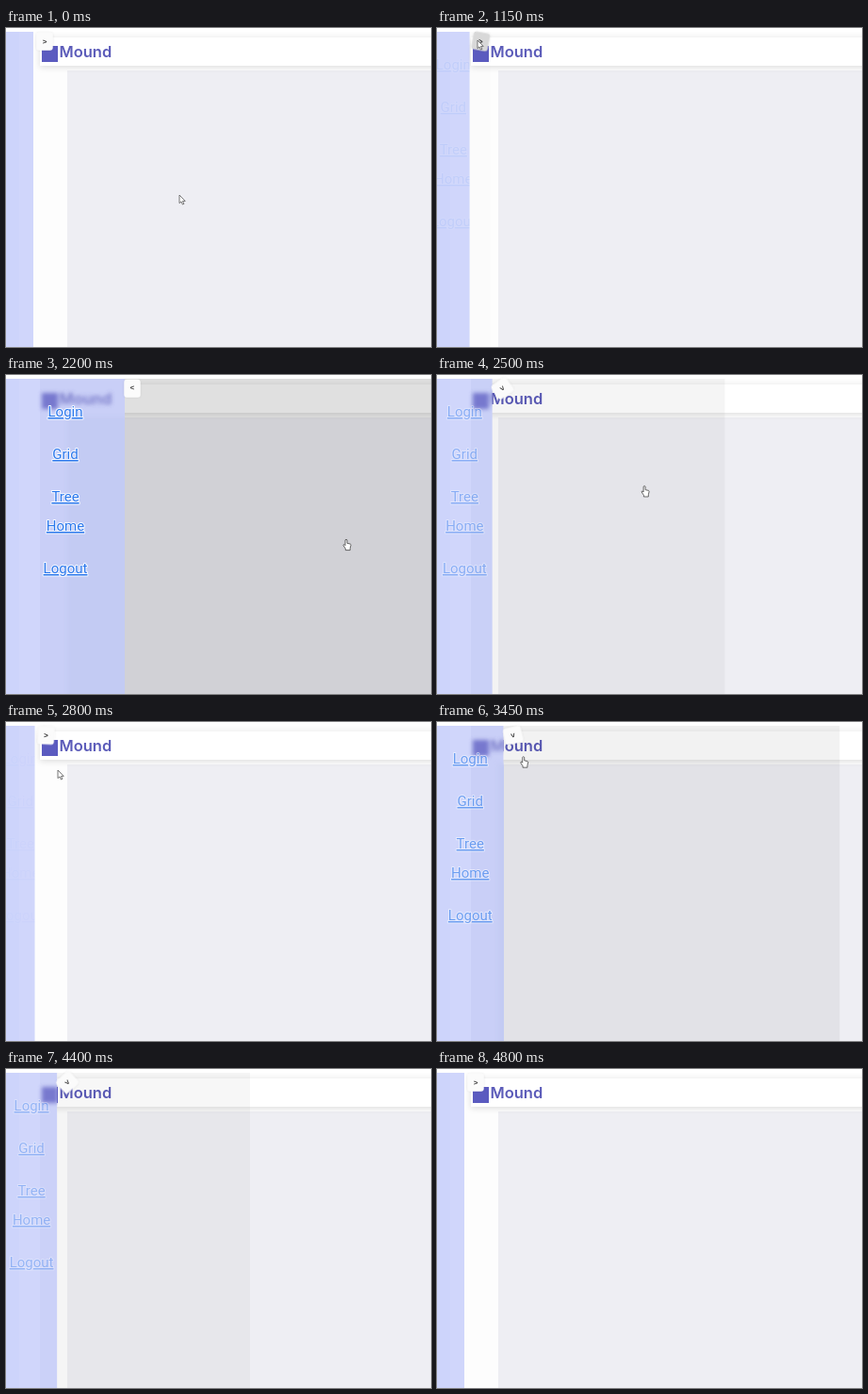
Write an HTML page that moves like this. It is 451 px wide and 338 px high and loops after 4850 ms.

```html
<!DOCTYPE html>
<html lang="en">
<head>
<meta charset="utf-8">
<title>Sliding side menu</title>
<style>
  html, body { margin: 0; width: 100%; height: 100%; overflow: hidden; background: #fff; }
  svg { display: block; width: 100vw; height: 100vh; }
  .brand { font: 600 16.5px Inter, sans-serif; fill: #5b5bb9; }
  .links text {
    font: 15px Roboto, sans-serif; text-anchor: middle; text-decoration: underline;
    fill: #2b78ec; stroke: #f4f7ff; stroke-width: 2px; stroke-linejoin: round; paint-order: stroke;
  }
  .glyph { font: bold 8px "Liberation Sans", Arial, sans-serif; text-anchor: middle; fill: #333; }
</style>
</head>
<body>
<svg viewBox="0 0 451 338" xmlns="http://www.w3.org/2000/svg">
  <defs>
    <filter id="soft" x="-20%" y="-20%" width="140%" height="140%">
      <feGaussianBlur stdDeviation="1.9"/>
    </filter>
    <filter id="drop" x="-5%" y="-50%" width="110%" height="200%">
      <feDropShadow dx="0" dy="1.5" stdDeviation="3" flood-color="#000" flood-opacity=".13"/>
    </filter>
    <filter id="lift" x="-30%" y="-30%" width="160%" height="160%">
      <feDropShadow dx="0" dy="0" stdDeviation="1" flood-color="#000" flood-opacity=".1"/>
    </filter>
    <clipPath id="pane"><rect id="paneBox" y="4" height="334"/></clipPath>
    <g id="logo">
      <rect x="38" y="19" width="17" height="17" fill="#5b5bc0"/>
      <text class="brand" x="56.5" y="31">Mound</text>
    </g>
  </defs>

  <rect width="451" height="338" fill="#fff"/>
  <rect x="29" y="4" width="422" height="334" fill="#fdfdfd"/>
  <rect x="65" y="45" width="386" height="293" fill="#eeeef3"/>
  <rect x="36" y="10" width="440" height="30" fill="#fff" filter="url(#drop)"/>
  <rect width="451" height="4" fill="#fff"/>
  <use href="#logo"/>

  <rect id="dim" y="4" height="334" fill="#000"/>

  <g clip-path="url(#pane)">
    <rect y="4" width="130" height="334" fill="#d0d6fb"/>
    <rect y="4" width="14" height="334" fill="#cdd4fb"/>
    <rect id="tint" x="36" y="4" width="94" height="334" fill="#4a58a8"/>
    <g filter="url(#soft)">
      <rect x="65" y="44" width="90" height="320" fill="#c3cbf3"/>
      <use href="#logo" opacity=".75"/>
    </g>
    <g id="links" class="links">
      <text y="44">Login</text>
      <text y="89">Grid</text>
      <text y="134">Tree</text>
      <text y="165">Home</text>
      <text y="210">Logout</text>
    </g>
  </g>

  <g id="button">
    <rect id="face" x="-8.7" y="-9.5" width="17.4" height="19" rx="3" filter="url(#lift)"/>
    <text class="glyph" y="2.7">&gt;</text>
  </g>

  <g id="arrow" stroke="#555" stroke-width=".8" stroke-linejoin="round" fill="#fff">
    <path d="M0 0V8.6L2 6.9L3.4 10L4.8 9.4L3.5 6.4H6.2Z"/>
  </g>
  <g id="hand" stroke="#444" stroke-width=".8" stroke-linejoin="round" fill="#fff">
    <path d="M-1 .8Q0 -.5 1 .8V4.3L4.3 5Q5 5.3 5 6.2L4.2 9.5V11.6H-.7V10L-3 6.6Q-3 5.3 -1.8 5.7L-1 6.6Z"/>
  </g>
</svg>
<script>
  const LOOP = 4850, SLIDE = 700;
  const $ = id => document.getElementById(id);
  const set = (id, attrs) => {
    for (const k in attrs) $(id).setAttribute(k, attrs[k]);
  };
  const mix = (a, b, k) => a + (b - a) * k;
  const clamp = v => Math.max(0, Math.min(1, v));

  // CSS "ease": cubic-bezier(.25, .1, .25, 1)
  function ease(x) {
    if (x <= 0 || x >= 1) return clamp(x);
    const curve = (a, b, u) => 3 * a * u * (1 - u) ** 2 + 3 * b * u * u * (1 - u) + u ** 3;
    let lo = 0, hi = 1;
    for (let i = 0; i < 24; i++) {
      const mid = (lo + hi) / 2;
      if (curve(.25, .25, mid) < x) lo = mid; else hi = mid;
    }
    return curve(.1, 1, lo);
  }

  // Start times of the slides: open, close, open, close
  const toggles = [1100, 2215, 3270, 4090];
  const openness = t =>
    toggles.reduce((p, start, i) => p + (i % 2 ? -1 : 1) * ease((t - start) / SLIDE), 0);

  // Pointer stops: time, x, y
  const stops = [
    [0, 184, 177], [50, 184, 177], [420, 14, 3], [580, 66, 20], [900, 43, 13], [1200, 43, 13],
    [1880, 361, 174], [2250, 361, 174], [2780, 55, 51], [2850, 55, 51], [3150, 44, 13],
    [3320, 44, 13], [3800, 305, 142], [4130, 305, 142], [4390, 460, 345], [LOOP, 460, 345]
  ];
  function pointer(t) {
    const i = stops.findIndex(s => s[0] > t);
    const a = stops[i - 1], b = stops[i];
    const k = (t - a[0]) / (b[0] - a[0]), s = k * k * (3 - 2 * k);
    return [mix(a[1], b[1], s), mix(a[2], b[2], s)];
  }

  function draw(t) {
    const p = clamp(openness(t));
    const width = mix(29, 126, p), reach = 1000 * p, knob = mix(41, 134, p);
    const [x, y] = pointer(t);

    set("dim", { width: Math.min(451, reach), opacity: .123 * p });
    set("paneBox", { width });
    set("tint", { opacity: .05 * clamp(p * 3) });
    set("links", {
      transform: `translate(${width / 2} 0)`,
      opacity: clamp(p * 1.4)
    });

    const over = Math.abs(x - knob) < 9 && Math.abs(y - 14) < 10;
    set("button", { transform: `translate(${knob} 14.2) rotate(${180 * p})` });
    set("face", { fill: over ? "#d8d8d8" : "#fbfbfb" });

    const onDim = p > .02 && x > width && x < reach && !over;
    const place = `translate(${x} ${y})`;
    set("arrow", { transform: place, visibility: onDim ? "hidden" : "visible" });
    set("hand", { transform: place, visibility: onDim ? "visible" : "hidden" });
  }

  function tick() {
    draw(performance.now() % LOOP);
    requestAnimationFrame(tick);
  }
  tick();
</script>
</body>
</html>
```
